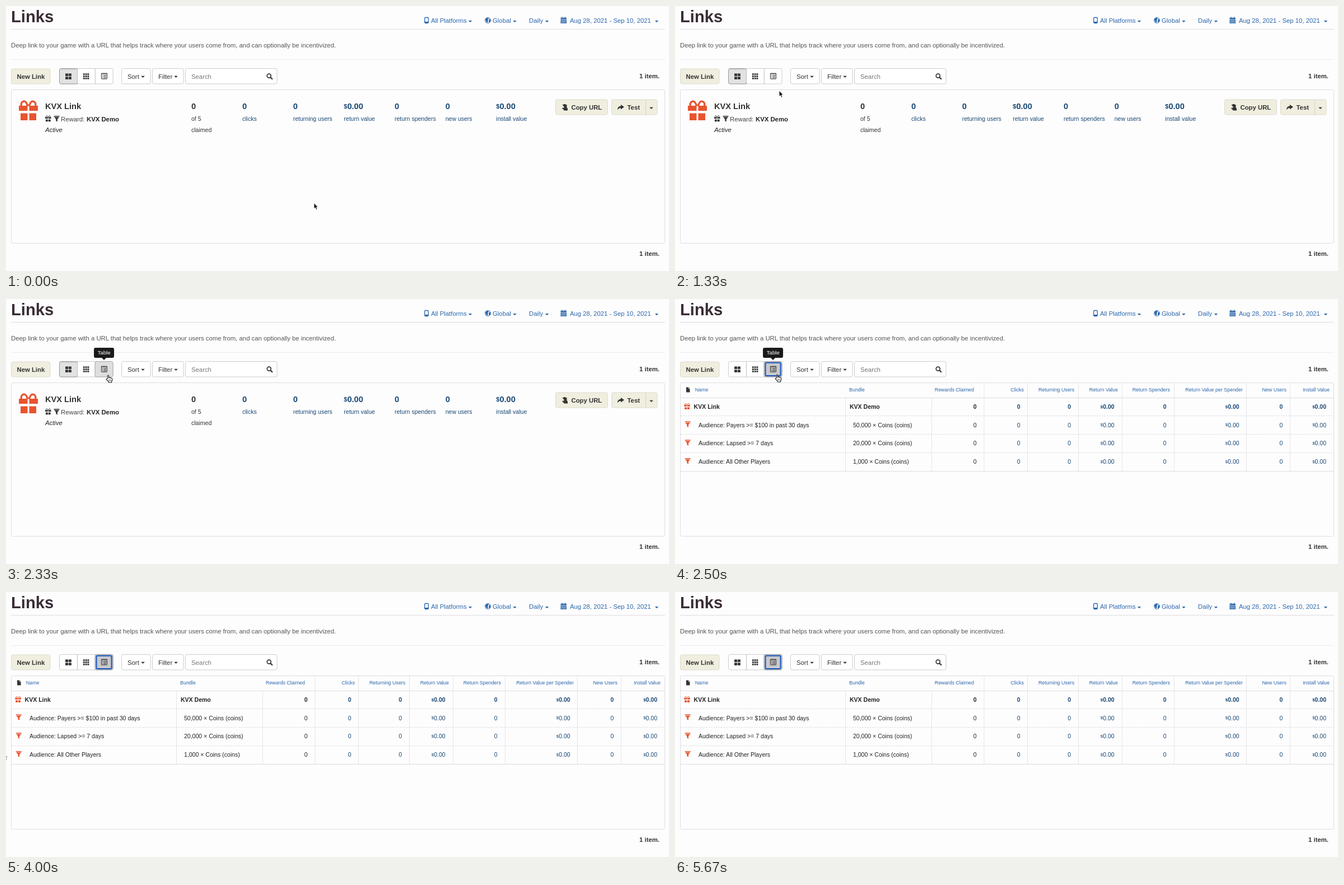
An HTML page that plays this animation: 1184x473 px, repeating every 5840 ms.

```html
<!DOCTYPE html>
<html lang="en">
<head>
<meta charset="utf-8">
<title>Links</title>
<style>
  html, body { margin: 0; width: 100%; height: 100%; overflow: hidden; background: #fefdfe; }
  svg { display: block; width: 1184px; height: 473px; font-family: "Liberation Sans", Arial, Helvetica, sans-serif; }
  text { white-space: pre; }
</style>
</head>
<body>
<svg id="stage" viewBox="0 0 1184 473">
  <defs>
    <g id="gift">
      <path d="M0 9.5h15.5v9H0zM18.500 9.500h15.500v9H18.500zM3 23h12.500v12.500H3zM18.500 23h12.500v12.500H18.500z"/>
      <path d="M4.500 10C3 5 6 1.600 9.500 1.600Q13 1.600 15 8.500H19Q21 1.600 24.500 1.600C28 1.600 31 5 29.500 10" fill="none" stroke="currentColor" stroke-width="3.200"/>
    </g>
    <path id="funnel" d="M0 0h10v1.500H0zM.5 2.300h9L6.300 6v4.500L3.700 9V6z"/>
    <path id="caret" d="M-3.300 -1.600h6.600L0 1.800z"/>
  </defs>
</svg>
<script>
const stage = document.getElementById('stage');
const INK = '#333', BLACK = '#222', LINK = '#2a67ab', NAVY = '#174873', ORANGE = '#e8542f', LINE = '#dcdce0';
const BASE = 11.34, SMALL = 10.53, HEAD = 8.91, TITLE = 14.58;

const text = (x, y, s, size = BASE, fill = INK, attrs = '') =>
  `<text x="${x}" y="${y}" font-size="${size}" fill="${fill}" ${attrs}>${s}</text>`;
const bold = (x, y, s, size, fill, attrs = '') => text(x, y, s, size, fill, 'font-weight="700" ' + attrs);
const rect = (x, y, w, h, fill, stroke = 'none', r = 0, attrs = '') =>
  `<rect x="${x}" y="${y}" width="${w}" height="${h}" rx="${r}" fill="${fill}" stroke="${stroke}" ${attrs}/>`;
const path = (d, stroke = LINE, attrs = '') => `<path d="${d}" fill="none" stroke="${stroke}" ${attrs}/>`;
const shape = (d, fill = INK, attrs = '') => `<path d="${d}" fill="${fill}" ${attrs}/>`;
const use = (id, x, y, fill = INK, scale = 1) =>
  `<use href="#${id}" transform="translate(${x} ${y}) scale(${scale})" fill="${fill}" color="${fill}"/>`;
const group = (id, body) => `<g id="${id}">${body}</g>`;
const END = 'text-anchor="end"';
const money = size => `<tspan font-size="${size * .75}" dy="${-size * .1}">$</tspan><tspan dy="${size * .1}">0.00</tspan>`;
const cream = (x, y, w, h) => rect(x, y, w, h, '#efeedf', '#dddccd', 3);
const white = (x, w) => rect(x, 111.5, w, 27.5, '#fff', '#ccc', 3);
const squares = (x, y, n, step, w, h) => Array.from({ length: n * n }, (_, i) =>
  rect(x + i % n * step, y + Math.floor(i / n) * step, w, h, INK)).join('');

function header() {
  const menus = [[759, 'All Platforms', 829], [869, 'Global', 908.5], [934, 'Daily', 966], [1007, 'Aug 28, 2021 - Sep 10, 2021', 1162]];
  return bold(9, 29, 'Links', 29.16, '#3a2d36')
    + menus.map(([x, s, c]) => text(x, 30, s, BASE, LINK) + use('caret', c, 27.5, LINK, .95)).join('')
    + rect(747.7, 20.5, 6.6, 10, 'none', LINK, 1.5, 'stroke-width="1.3"') + rect(748, 28, 6, 2, LINK)
    + `<circle cx="860.500" cy="25.500" r="4.900" fill="#fff" stroke="${LINK}"/>`
    + shape('M857 22l4-1 1 2-2 2 1 2-2 3-2-3-1-3zM863 23l2 1v4l-2 2-1-3z', LINK)
    + rect(990.5, 21, 10.5, 2.5, LINK) + rect(990.5, 24.3, 10.5, 6.7, LINK)
    + path('M993 19.500v2M998.500 19.500v2', LINK, 'stroke-width="1.500"')
    + path('M991 26.500h9.500M991 28.700h9.500M993.200 25v6M995.800 25v6M998.400 25v6', '#fff', 'stroke-width=".4"')
    + path('M9 41.500H1177') + path('M9 95.500H1177', '#ebebed')
    + text(9, 74, 'Deep link to your game with a URL that helps track where your users come from, and can optionally be incentivized.', BASE, '#555');
}

function toolbar() {
  return cream(9.5, 112, 69.5, 27) + bold(19.5, 129.5, 'New Link')
    + white(95.5, 95.5)
    + group('gridOn', rect(95.5, 111.5, 32, 27.5, '#e2e2e2', '#999', 3) + path('M97 113h29.500', '#cfcfcf', 'stroke-width="2"'))
    + group('hover', rect(159, 111.5, 32, 27.5, '#dedede', '#aaa', 3))
    + group('tableOn', rect(159, 111.5, 32, 27.5, '#cbcbcb', '#999', 3) + rect(161.5, 113.7, 27, 23.2, '#c9c9cc', '#1856c0', 2, 'stroke-width="2"'))
    + path('M127.500 112v27M159.200 112v27', '#bbb')
    + squares(106, 120.5, 2, 5.8, 5, 4.6) + squares(137.8, 120.3, 3, 3.8, 2.9, 2.8)
    + rect(170.4, 120.2, 10, 10, 'none', INK, .5) + path('M170 121h11M172 123.800h1.200M174.200 123.800h5M172 126h1.200M174.200 126h5M172 128.200h1.200M174.200 128.200h5', INK, 'stroke-width="1.100"')
    + white(206.5, 51.5) + text(217, 129.5, 'Sort') + use('caret', 244.5, 126.3)
    + white(261.5, 55.5) + text(272, 129.5, 'Filter') + use('caret', 303.5, 126.3)
    + white(320.5, 163.5) + text(331, 129.5, 'Search', BASE, '#777')
    + '<circle cx="469.700" cy="124.600" r="3.500" fill="none" stroke="#333" stroke-width="1.700"/>'
    + path('M472.300 127.200l3.600 3.600', INK, 'stroke-width="2.200"')
    + bold(1167, 129, '1 item.', BASE, INK, END) + bold(1167, 445.5, '1 item.', BASE, INK, END)
    + rect(9.5, 149.5, 1167, 274, 'none', LINE, 3);
}

function cards() {
  const stats = [[422, 'clicks'], [512.7, 'returning users'], [603.3, 'return value', 1], [694, 'return spenders'], [784.7, 'new users'], [875.3, 'install value', 1]];
  return use('gift', 23, 168.5, ORANGE)
    + bold(70, 184, 'KVX Link', TITLE)
    + use('gift', 70, 195.3, INK, .31) + use('funnel', 85.5, 196)
    + text(98, 205.5, 'Reward:', BASE, '#444') + bold(144, 205.5, 'KVX Demo', BASE, BLACK)
    + text(70, 225, 'Active', BASE, BLACK, 'font-style="italic"')
    + bold(331, 184, '0', TITLE) + text(331, 205, 'of 5', SMALL) + text(331, 224.5, 'claimed', SMALL)
    + stats.map(([x, s, cash]) => bold(x, 184, cash ? money(TITLE) : '0', TITLE, NAVY) + text(x, 205, s, SMALL, NAVY)).join('')
    + cream(981.5, 167, 93, 27) + bold(1009.5, 185, 'Copy URL')
    + shape('M993.500 176h2l1-1h2l1 1h2v5l1.500 2v3.500h-6l-4-4 1.500-1 1.500 1v-3z') + path('M992.500 176.500l5 4.500', '#efeedf', 'stroke-width=".8"')
    + cream(1081.5, 167, 81.5, 27) + path('M1142.500 167v27', '#d5d4c5')
    + shape('M1092 185.500q0-6.500 6-7v-2.500l6 4.300-6 4.300v-2.500q-3.500-.2-6 3.400z')
    + bold(1109.5, 185, 'Test') + use('caret', 1152.5, 182.3);
}

function table() {
  const heads = ['Rewards Claimed', 'Clicks', 'Returning Users', 'Return Value', 'Return Spenders', 'Return Value per Spender', 'New Users', 'Install Value'];
  const headEnds = [534, 623, 713.3, 791, 884, 1014, 1092, 1169];
  const ends = [538.7, 616.6, 707, 784.7, 877.6, 1007.6, 1085.3, 1163];
  const rows = [
    [196, 'KVX Link', 'KVX Demo'],
    [228.5, 'Audience: Payers &gt;= $100 in past 30 days', '50,000 × Coins (coins)'],
    [261.3, 'Audience: Lapsed &gt;= 7 days', '20,000 × Coins (coins)'],
    [294, 'Audience: All Other Players', '1,000 × Coins (coins)']];
  return shape('M20 157.500h3.800v2.700h2.700v6.300H20zM24.500 157.500l2 2h-2z')
    + text(35.7, 165.3, 'Name', HEAD, LINK) + text(311, 165.3, 'Bundle', HEAD, LINK)
    + heads.map((s, i) => text(headEnds[i], 165.3, s, HEAD, LINK, END)).join('')
    + path('M10 176.500H1176M10 307.500H1176')
    + path('M10 208.500H1176M10 241.500H1176M10 274.500H1176', LINE, 'stroke-dasharray="3 1.500"')
    + path('M304.500 177V307M458.500 177V307' + [552, 629.5, 720.5, 798.5, 891.5, 1020.5, 1098.5].map(x => `M${x} 150V307`).join(''), '#e4e4e8')
    + rows.map(([y, name, bundle], i) => {
      const write = i ? text : bold;
      return (i ? use('funnel', 17.7, y - 10, ORANGE) : use('gift', 16.3, 186, ORANGE, .31))
        + write(i ? 42 : 33.6, y, name, SMALL, BLACK) + write(i ? 318 : 312, y, bundle, SMALL, BLACK)
        + ends.map((x, c) => write(x, y, [3, 5, 7].includes(c) ? money(SMALL) : '0', SMALL, c ? NAVY : BLACK, END)).join('');
    }).join('');
}

const overlay = group('tip', rect(157, 87, 36, 18, '#1a1a1a', 'none', 3) + shape('M171 105h8l-4 4z', '#1a1a1a') + text(175, 99.2, 'Table', 9.72, '#fff', 'text-anchor="middle"'))
  + group('arrow', shape('M0 0V10.500L2.400 8.400 4.200 12.300 6 11.500 4.300 7.700H7.300z', '#111', 'stroke="#fff" stroke-width=".9"'))
  + group('hand', shape('M1.500 6V1q0-1 1-1t1 1V4.500q2-1 2.600.4 1.700-.6 2 .6 1.900-.4 1.900 1.500 0 3-1.500 4.500V13H3.300V11.800L-.8 7.500q-.2-1.600 1.400-1.100z', '#fff', 'stroke="#222" stroke-width="1.100"')
    + path('M3.700 7.500v3M5.500 7.500v3M7.300 7.500v3', '#222', 'stroke-width=".7"'));

stage.insertAdjacentHTML('beforeend', header() + toolbar() + group('cards', cards()) + group('table', table()) + overlay);
const part = Object.fromEntries([...stage.querySelectorAll('g[id]')].map(g => [g.id, g]));

// Pointer stops: step, x, y
const stops = [[0, 550, 351.5], [2, 452, 312], [5, 229, 212], [7, 192, 166], [9, 180, 136], [14, 180, 136], [15, 180, 135], [16, 180, 135],
  [18, 23.5, 142], [21, -3, 278], [24, -4.5, 287.5], [28, -4.5, 308], [29, -4.5, 335], [31, -4.5, 379], [32, -20, 392], [35, -20, 392]];

function pointer(step) {
  const i = Math.max(1, stops.findIndex(s => s[0] >= step));
  const [a, x, y] = stops[i - 1], [b, u, v] = stops[i];
  const p = (step - a) / (b - a);
  return [x + (u - x) * p, y + (v - y) * p];
}

const LOOP = 5840;
function draw(now) {
  const step = Math.floor(now % LOOP * 6 / 1000 + .03); // six updates a second
  const onButton = step >= 9 && step <= 16, isTable = step >= 15;
  const show = (name, on) => part[name].setAttribute('opacity', +on);
  show('cards', !isTable);
  show('gridOn', !isTable);
  show('table', isTable);
  show('tableOn', isTable);
  show('hover', onButton && !isTable);
  show('tip', step < 9 || step > 18 ? 0 : step === 18 ? .33 : 1);
  show('hand', onButton);
  show('arrow', !onButton);
  const place = `translate(${pointer(step)})`;
  part.hand.setAttribute('transform', place);
  part.arrow.setAttribute('transform', place);
  requestAnimationFrame(draw);
}
requestAnimationFrame(draw);
</script>
</body>
</html>
```
